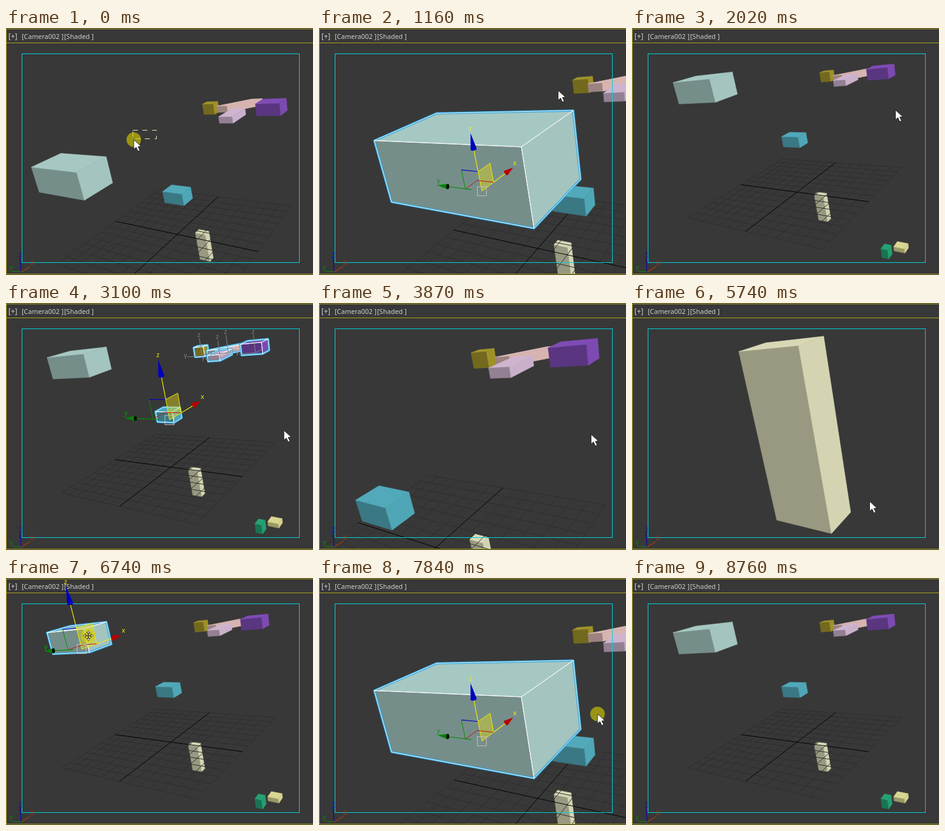
Animation of 507 by 407 pixels, one loop 8.99 s. Source, as an HTML page with a canvas:

```html
<!DOCTYPE html>
<html lang="en">
<head>
<meta charset="utf-8">
<title>Viewport zoom to selection</title>
<style>
html, body { margin: 0; width: 100%; height: 100%; overflow: hidden; background: #383838; }
canvas { display: block; }
</style>
</head>
<body>
<canvas id="stage" width="507" height="407"></canvas>
<script>
const ctx = document.getElementById('stage').getContext('2d');
const LOOP = 8990;

// Camera space: x right, y down, z forward. The camera only travels, it never turns.
const CENTER = [256, 214], FOCAL = 648;
const unit = v => v.map(n => n / Math.hypot(...v));
const cross = (a, b) => [a[1] * b[2] - a[2] * b[1], a[2] * b[0] - a[0] * b[2], a[0] * b[1] - a[1] * b[0]];
const X = unit([522, -329, FOCAL]), Z = unit([-372, -1866, -FOCAL]), Y = cross(Z, X);

// Where each camera sees the world origin
const wide = [19, 89.3, 459];
const close = [58, 82.2, 357];
const overview = [12.8, 43.9, 504];
const group = [-30, 90, 309];
const tall = [-36, -25.6, 26];

// Nearest upper corner, then size along x, y and z; turn swings the x edge
const box = (color, at, size, turn = 0) => ({ color, at, size, turn });
const SUNK = {
  pillar: box([216, 216, 182], [52, -2.6, -30.8], [9, 15.3, 40.7]),
  green: box([37, 162, 115], [-41.3, -137, -29.4], [9.4, 7.3, 10.9]),
  cream: box([216, 214, 144], [-30.8, -150.6, -31.5], [10.3, 11.6, 5.1])
};
const RAISED = {
  yellow: box([162, 148, 42], [60.2, -37.3, 138.9], [10.4, 14.1, 12]),
  pink: box([220, 184, 181], [85.6, -39.7, 129.6], [42, 13.4, 7.8], 0.87),
  lilac: box([207, 180, 207], [25.6, -77.4, 134.3], [29.4, 15.4, 6.8]),
  purple: box([127, 76, 181], [55.7, -114.4, 138.5], [18.8, 25.4, 12.7]),
  cyan: box([81, 169, 186], [-96.4, -92.9, 110.3], [12.5, 18.5, 9.8]),
  big: box([166, 200, 195], [-221.2, -141.1, 185.9], [16.8, 30, 12.1])
};
const UPPER = ['cyan', 'yellow', 'pink', 'lilac', 'purple'];
const SHADES = [0.71, 1, 0.98];

// Start time, camera, selection
const SCENES = [
  [0, wide, []], [440, wide, ['big']], [620, close, ['big']], [1320, close, []],
  [1480, overview, []], [2470, overview, UPPER], [3250, group, UPPER], [3750, group, []],
  [4290, overview, []], [5070, overview, ['pillar']], [5280, tall, ['pillar']], [5640, tall, []],
  [5800, overview, []], [6680, overview, ['big']], [6990, close, ['big']], [7920, close, []],
  [8150, overview, []]
];

// Pointer moves: start, end, x, y
const HOME = [211, 184];
const MOVES = [
  [80, 400, 140, 235], [560, 930, 395, 103], [1320, 1630, 420, 95], [1920, 2080, 458, 196],
  [2080, 2460, 265, 72], [2460, 2780, 459, 210], [3500, 4120, 432, 228], [4510, 5050, 314, 300],
  [5280, 5980, 495, 362], [6260, 6660, 136, 95], [6910, 7140, 343, 238], [7370, 7510, 460, 224],
  [7950, 8530, 452, 275], [8610, 8760, 480, 415]
];
const CLICKS = [1240, 3700, 5050, 5600, 7780];
const DRAGS = [[0, 420, 248, 168], [2080, 2470, 458, 196]];
const HOLD = [6660, 6950];

const toCamera = (p, eye) => eye.map((o, i) => o + p[0] * X[i] + p[1] * Y[i] + p[2] * Z[i]);
const toScreen = p => [0, 1].map(i => CENTER[i] + FOCAL * p[i] / p[2]);
const mix = (a, b, k) => a.map((n, i) => n + (b[i] - n) * k);

function path(points, fill, stroke, width = 1, shut = true) {
  ctx.beginPath();
  points.forEach(p => ctx.lineTo(p[0], p[1]));
  if (shut) ctx.closePath();
  if (fill) { ctx.fillStyle = fill; ctx.fill(); }
  if (stroke) { ctx.strokeStyle = stroke; ctx.lineWidth = width; ctx.stroke(); }
}
const line = (a, b, color, width) => path([a, b], null, color, width, false);

function disc(x, y, rx, ry, angle, color) {
  ctx.fillStyle = color;
  ctx.beginPath();
  ctx.ellipse(x, y, rx, ry, angle, 0, 2 * Math.PI);
  ctx.fill();
}

function label(text, x, y, color, size = 11) {
  ctx.font = size + 'px "Noto Sans", sans-serif';
  ctx.fillStyle = color;
  ctx.fillText(text, x, y);
}

// A world line, cut where it passes behind the camera
function worldLine(from, to, eye, color) {
  let a = toCamera(from, eye), b = toCamera(to, eye);
  if (a[2] > b[2]) [a, b] = [b, a];
  if (b[2] <= 1) return;
  if (a[2] < 1) a = mix(a, b, (1 - a[2]) / (b[2] - a[2]));
  line(toScreen(a), toScreen(b), color);
}

function drawGrid(eye) {
  const cross = (k, color) => {
    worldLine([k, -100, 0], [k, 100, 0], eye, color);
    worldLine([-100, k, 0], [100, k, 0], eye, color);
  };
  for (let i = -7; i <= 7; i++) if (i) cross(i * 100 / 7, '#2e2e2e');
  cross(0, '#000');
}

function drawBox({ color, at, size: [w, l, h], turn }, eye, selected) {
  const corner = (i, j, k) => toCamera([
    at[0] + i * w * Math.cos(turn), at[1] + j * l - i * w * Math.sin(turn), at[2] - k * h], eye);
  const solid = [corner(0, 1, 0), corner(0, 0, 0), corner(0, 0, 1), corner(0, 1, 1),
    corner(1, 1, 0), corner(1, 0, 0), corner(1, 0, 1)];
  if (solid.some(p => p[2] < 2)) return;
  const [a, b, c, d, e, f, g] = solid.map(toScreen);
  const faces = [[a, b, c, d], [a, e, f, b], [b, f, g, c]];
  faces.forEach((face, i) => {
    const tone = `rgb(${color.map(n => Math.round(n * SHADES[i]))})`;
    path(face, tone, tone, 0.5);
  });
  if (!selected) return;
  path([a, e, f, g, c, d], null, '#2fa5de', 3.5);
  faces.forEach(face => path(face, null, '#fff', 0.9));
}

// Middle of the underside
function pivot({ at, size: [w, l, h], turn }, eye) {
  return toCamera([at[0] + w / 2 * Math.cos(turn), at[1] + l / 2 - w / 2 * Math.sin(turn), at[2] - h], eye);
}

// Screen points on axes whose length follows the depth
function axesAt(center, reach) {
  return (x, y, z) => toScreen(center.map((n, i) =>
    n + center[2] * reach * (x * X[i] + y * Y[i] + z * Z[i])));
}

function drawTripod(center) {
  const at = axesAt(center, 0.045), gray = '#858585';
  const o = at(0, 0, 0), y = at(0, 1, 0), z = at(0, 0, 1);
  for (const tip of [at(1, 0, 0), y, z]) line(o, tip, gray);
  label('z', z[0] - 3, z[1] - 2, gray, 10);
  label('Y', y[0] - 6, y[1] + 3, gray, 10);
}

function cone(base, tip, color, half) {
  const angle = Math.atan2(tip[1] - base[1], tip[0] - base[0]);
  const nx = -Math.sin(angle) * half, ny = Math.cos(angle) * half;
  path([tip, [base[0] + nx, base[1] + ny], [base[0] - nx, base[1] - ny]], color);
  disc(base[0], base[1], half * 0.55, half, angle, color);
}

function drawGizmo(center) {
  const at = axesAt(center, 0.155), k = 0.35;
  const yellow = '#f4ee00', green = '#009000', red = '#c01010';
  const px = at(k, 0, 0), py = at(0, k, 0), pz = at(0, 0, k), o = at(0, 0, 0);
  path([o, px, at(k, 0, k), pz], 'rgba(225,215,30,.45)', yellow);
  line(py, at(0, k, k), green);
  line(at(0, k, k), pz, '#0000c8', 1.2);
  line(py, at(k, k, 0), red);
  line(at(k, k, 0), px, red);
  line(at(0, 0.22, 0), at(0, 0.76, 0), green, 1.2);
  line(pz, at(0, 0, 0.72), yellow, 1.2);
  line(px, at(0.76, 0, 0), yellow, 1.2);
  const tx = at(1, 0, 0), ty = at(0, 1, 0), tz = at(0, 0, 1), cap = at(0, 0.75, 0);
  cone(at(0, 0, 0.74), tz, '#0000c0', 5);
  cone(at(0.76, 0, 0), tx, '#b80000', 4.5);
  cone(cap, ty, '#008600', 4.5);
  disc(cap[0], cap[1], 2.5, 4, 0, '#000');
  ctx.strokeStyle = '#c9bcbc';
  ctx.lineWidth = 1;
  ctx.strokeRect(Math.round(o[0]) - 7.5, Math.round(o[1]) - 7.5, 15, 15);
  label('x', tx[0], tx[1] - 4, yellow);
  label('y', ty[0] - 1, ty[1] - 4, '#00a000');
  label('z', tz[0] - 3, tz[1] - 4, yellow);
}

function drawFrame() {
  ctx.lineWidth = 1;
  ctx.strokeStyle = '#00d4d8';
  ctx.strokeRect(26.5, 42.5, 458, 344);
  const edge = '#aca21c', text = '#cfcfcf', corner = [25, 402];
  for (const y of [1.5, 24.5, 405.5]) line([0, y], [507, y], edge);
  line([0.5, 1], [0.5, 406], edge);
  label('[+]', 4, 18, text, 12);
  label('[Camera002 ]', 26, 18, text);
  label('[Shaded ]', 96, 18, text);
  line(corner, [23, 379], '#0808b8', 1.2);
  line(corner, [40, 393], '#b03a10', 1.2);
  line(corner, [10, 401], '#0a8a0a', 1.2);
  label('Z', 21, 378, '#1010c0', 10);
  label('X', 40, 391, '#a83a18', 10);
  label('Y', 6, 400, '#0a8a0a', 10);
}

// Every move sets off gently
function pointerAt(t) {
  return MOVES.reduce((from, [start, end, x, y]) => {
    const k = Math.min(1, Math.max(0, (t - start) / (end - start)));
    return mix(from, [x, y], k * k);
  }, HOME);
}

function drawPointer(t) {
  const [x, y] = pointerAt(t);
  const during = s => t >= s[0] && t < s[1];
  const drag = DRAGS.find(during);
  if (drag) {
    const left = Math.round(x) - 1.5, top = Math.round(y) - 1.5;
    ctx.setLineDash([8, 8]);
    ctx.strokeStyle = '#eeeec4';
    ctx.lineWidth = 1;
    ctx.strokeRect(left, top, drag[2] + 0.5 - left, drag[3] + 0.5 - top);
    ctx.setLineDash([]);
  }
  const holding = during(HOLD);
  if (drag || holding || CLICKS.some(c => t >= c && t < c + 100)) {
    disc(x, y, 12, 12, 0, 'rgba(215,205,0,.62)');
  }
  if (holding) {
    for (let i = 0; i < 4; i++) {
      ctx.save();
      ctx.translate(x, y);
      ctx.rotate(i * Math.PI / 2);
      line([0, 0], [0, -6], '#333', 1.3);
      path([[0, -8], [-3, -4.5], [3, -4.5]], '#fff', '#333');
      ctx.restore();
    }
    return;
  }
  const arrow = [[0, 0], [0, 16], [4, 12.5], [7, 19], [10, 17.5], [7, 11.5], [12, 11]];
  path(arrow.map(p => [x + p[0], y + p[1]]), '#fff', '#111', 0.8);
}

function draw(t) {
  const [, eye, selection] = SCENES.filter(s => s[0] <= t).pop();
  const drawAll = boxes => {
    for (const name in boxes) drawBox(boxes[name], eye, selection.includes(name));
  };
  ctx.fillStyle = '#383838';
  ctx.fillRect(0, 0, 507, 407);
  ctx.save();
  ctx.beginPath();
  ctx.rect(1, 25, 506, 380);
  ctx.clip();
  ctx.lineJoin = 'round';
  drawAll(SUNK);
  drawGrid(eye);
  drawAll(RAISED);
  const pivots = selection.map(name => pivot(RAISED[name] || SUNK[name], eye));
  pivots.slice(1).forEach(drawTripod);
  ctx.restore();
  drawFrame();
  if (pivots.length) drawGizmo(pivots[0]);
  drawPointer(t);
}

const start = performance.now();
function tick() {
  draw((performance.now() - start) % LOOP);
  requestAnimationFrame(tick);
}
tick();
</script>
</body>
</html>
```
